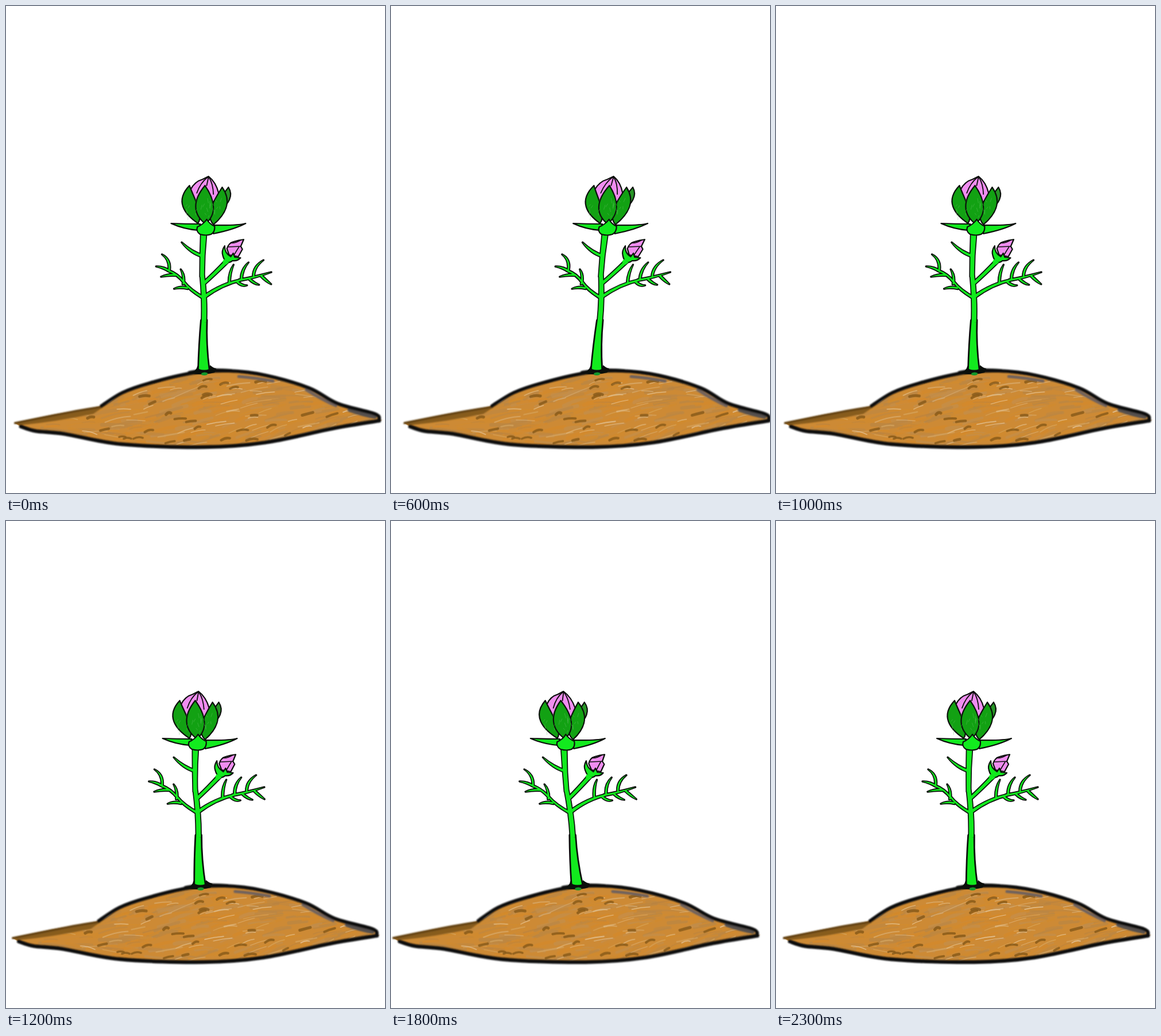
Animation, 660 px wide and 849 px high, one loop 2.4 s. Source, as an HTML page:

```html
<!DOCTYPE html>
<html lang="en">
<head>
<meta charset="utf-8">
<title>Swaying flower</title>
<style>
html, body { margin: 0; width: 100%; height: 100%; overflow: hidden; background: #fff; }
svg { display: block; }
path { stroke-linecap: round; stroke-linejoin: round; }
</style>
</head>
<body>
<svg width="660" height="849" viewBox="0 0 660 849">
  <defs>
    <filter id="soft" x="-5%" y="-20%" width="110%" height="140%"><feGaussianBlur stdDeviation="1"/></filter>
    <filter id="faint" x="-5%" y="-20%" width="110%" height="140%"><feGaussianBlur stdDeviation=".7"/></filter>
    <clipPath id="moundClip"><path id="moundShape"/></clipPath>
  </defs>
  <g id="scene">
    <g id="soil" clip-path="url(#moundClip)" filter="url(#faint)"></g>
    <g id="rim" filter="url(#soft)"></g>
    <g id="plant"></g>
  </g>
</svg>
<script>
const $ = id => document.getElementById(id);
const INK = '#0b0f0b', GREEN = '#12ea1e', LEAF = '#12a113', PINK = '#f08df0';

let seed = 11;
const rnd = (a = 0, b = 1) => {
  seed = (seed * 16807) % 2147483647;
  return a + (b - a) * seed / 2147483647;
};
const pick = list => list[Math.floor(rnd(0, list.length))];

function draw(parent, d, fill, stroke, width, extra = {}) {
  const p = document.createElementNS('http://www.w3.org/2000/svg', 'path');
  const attrs = { d, fill: fill || 'none', stroke: stroke || 'none', 'stroke-width': width || 0, ...extra };
  for (const k in attrs) p.setAttribute(k, attrs[k]);
  $(parent).append(p);
}
const outlined = (d, fill) => draw('plant', d, fill, INK, 2.2);

// Smooth open curve through "x,y x,y ..."
function curve(text) {
  const p = text.split(' ').map(s => s.split(',').map(Number));
  let d = 'M' + p[0];
  for (let i = 0; i < p.length - 1; i++) {
    const a = p[i - 1] || p[i], b = p[i], c = p[i + 1], e = p[i + 2] || c;
    const mix = (o, q, r) => [0, 1].map(k => o[k] + (q[k] - r[k]) / 6);
    d += `C${mix(b, c, a)} ${mix(c, b, e)} ${c}`;
  }
  return d;
}

// Sprig bent towards (cx,cy); half widths at root, middle and tip
function sprig(x0, y0, cx, cy, x1, y1, w0 = 1.5, w = 1.8, w1 = 0) {
  const len = Math.hypot(x1 - x0, y1 - y0);
  const nx = (y0 - y1) / len, ny = (x1 - x0) / len;
  const at = (x, y, k) => `${x + nx * k} ${y + ny * k} `;
  return `M${at(x0, y0, w0)}Q${at(cx, cy, w)}${at(x1, y1, w1)}L${at(x1, y1, -w1)}Q${at(cx, cy, -w)}${at(x0, y0, -w0)}Z`;
}

// Pointed petal hanging from its tip, bulging to the left and right
function petal(tx, ty, bx, by, left, right, fill = LEAF) {
  const h = by - ty, hi = ty + h * .4, lo = by - h * .25;
  outlined(`M${tx} ${ty}C${tx - left} ${hi} ${bx - left} ${lo} ${bx} ${by}C${bx + right} ${lo} ${tx + right} ${hi} ${tx} ${ty}Z`, fill);
}

// Mound
const topEdge = '164,697 200,674 245,658 320,640 385,636 450,644 525,666 575,693 640,711 648,721';
const lowEdge = '648,723 570,736 450,761 345,769 200,764 100,746 50,741 24,733';
$('moundShape').setAttribute('d', curve('13,727 80,713 ' + topEdge + ' ' + lowEdge) + 'Z');
draw('soil', 'M0 600H660V800H0Z', '#cd8a35');

// Strokes follow the dome above and the bowl below
function scribble(count, colors, min, max, len, opacity) {
  for (let i = 0; i < count; i++) {
    const x = rnd(70, 620), y = rnd(650, 764), l = rnd(len * .4, len);
    const tilt = (x - 350) * .0016 * (705 - y) / 55 - .18 + rnd(-.22, .22);
    const dx = l * Math.cos(tilt), dy = l * Math.sin(tilt);
    draw('soil', `M${x - dx} ${y - dy}Q${x} ${y - rnd(0, 4)} ${x + dx} ${y + dy}`, '', pick(colors),
      rnd(min, max), { opacity });
  }
}
scribble(210, ['#d6892a', '#bf8842', '#c48f4d', '#d18a2f', '#b98646'], 3, 7, 28, .65);
scribble(100, ['#d9ab68', '#dcb681', '#d48c2c', '#ba8340'], 1.2, 2.6, 24, .6);
scribble(40, ['#ecd7b8', '#e6c493'], .8, 1.8, 17, .7);
scribble(34, ['#855718'], 3.5, 5, 10, .8);

draw('rim', 'M12 727L80 712L165 697L176 693L150 711Q90 724 22 731Z', '#875c1f');
draw('rim', curve('14,727 110,708 164,699'), '', '#654414', 4);
draw('rim', 'M402 646Q430 648 462 654M520 669Q545 685 572 697', '', '#6f625d', 5);
draw('rim', 'M596 704Q622 713 640 716', '', '#55504e', 7);
draw('rim', curve(topEdge), '', '#0d0e10', 6);
draw('rim', curve(lowEdge), '', '#0d0e10', 6.5);
draw('rim', 'M316 639Q350 633 388 636', '', INK, 6);

// Stem, branches and side leaves share one outline
const foot = sprig(341, 635, 338, 590, 340, 548, 8.5, 5, 4);
let green = foot
  + sprig(340, 552, 341, 510, 335.5, 468, 4, 4, 3.4)
  + sprig(335.5, 472, 335, 435, 337, 398, 3.4, 3.4, 4.6)
  + sprig(336, 436, 316, 430, 299, 412, 2, 2.4)
  + sprig(336, 486, 356, 468, 380, 443, 2.5, 2.5, 3.2)
  + sprig(339, 509, 315, 496, 303, 480, 2, 1.6, 1.4)
  + sprig(304, 482, 294, 468, 276, 461, 1.4, 1.5, 1.4)
  + sprig(280, 463, 268, 455, 255, 454)
  + sprig(278, 461, 280, 442, 265, 433)
  + sprig(290, 469, 277, 468, 264, 472)
  + sprig(303, 485, 305, 469, 298, 459)
  + sprig(311, 492, 298, 489, 287, 493)
  + sprig(340, 507, 370, 485, 402, 478, 2.5, 2, 1.6)
  + sprig(400, 478, 425, 474, 456, 464);
for (let i = 0; i < 3; i++) {
  const x = 383 + 21 * i, y = 482 - 5 * i;
  green += sprig(x, y, x, y - 18, 390 + 26 * i, 451 - 4 * i)
    + sprig(x + 13, y - 2, x + 22, y + 7, x + 31, 487 - i);
}
draw('plant', foot, '', INK, 5.5);
draw('plant', green, GREEN, INK, 3.4, { 'paint-order': 'stroke' });
draw('plant', 'M317 640Q328 637 330 627L333 633Q342 636 350 633L352 626Q357 631 363 632L360 639Q340 645 317 640Z', INK);
draw('plant', 'M337 640Q343 637 348 640L347 643Q342 645 337 643Z', '#13962a');

// Small bud
outlined('M378 423Q381 413 389 411Q398 408 407 407L402 419L405 424L398 437L382 434Z', PINK);
draw('plant', 'M380 420L402 419M384 413Q392 414 402 408M399 420Q394 428 390 435', '', INK, 1.6);
outlined('M374 418Q368 427 371 435Q373 443 378 446Q383 449 388 444Q397 445 402 439L392 438L389 431L385 437Q374 431 374 418Z', GREEN);
draw('plant', 'M374 441L382 447L377 451L370 446Z', GREEN);

// Main flower
outlined('M313 320Q320 306 334 302L344 297Q357 307 362 326L350 350H322Z', PINK);
draw('plant', 'M343 298Q330 308 324 326M344 298L341 313M345 299Q352 310 353 328', '', INK, 1.8);
petal(379, 316, 368, 355, 12, 10, '#279426');
petal(311, 313, 327, 379, 25, 10);
petal(368, 316, 354, 381, 16, 19);
petal(338, 313, 340, 380, 22, 19);
for (let i = 0; i < 26; i++) {
  const x = rnd(306, 368), y = rnd(334, 368);
  draw('plant', `M${x} ${y}l${rnd(-3, 3)} ${rnd(3, 8)}`, '', '#6cc46a', .7, { opacity: .55 });
}

// Calyx
outlined('M280 379Q305 380 331 380L327 391Q302 389 280 379Z', GREEN);
outlined('M410 379Q395 383 354 382L354 397Q389 390 410 379Z', GREEN);
outlined('M342 372Q336 381 326 385Q323 393 331 398Q341 401 350 398Q357 394 356 384Q347 380 342 372Z', GREEN);

// Shear about the lower edge, back and forth in twelve equal steps each way
function frame() {
  const step = Math.floor(performance.now() / 100) % 24;
  const lean = .0158 * (6 - Math.abs((step + 7) % 24 - 12));
  $('scene').setAttribute('transform', `matrix(1 0 ${-lean} 1 ${849 * lean} 0)`);
  requestAnimationFrame(frame);
}
frame();
</script>
</body>
</html>
```
